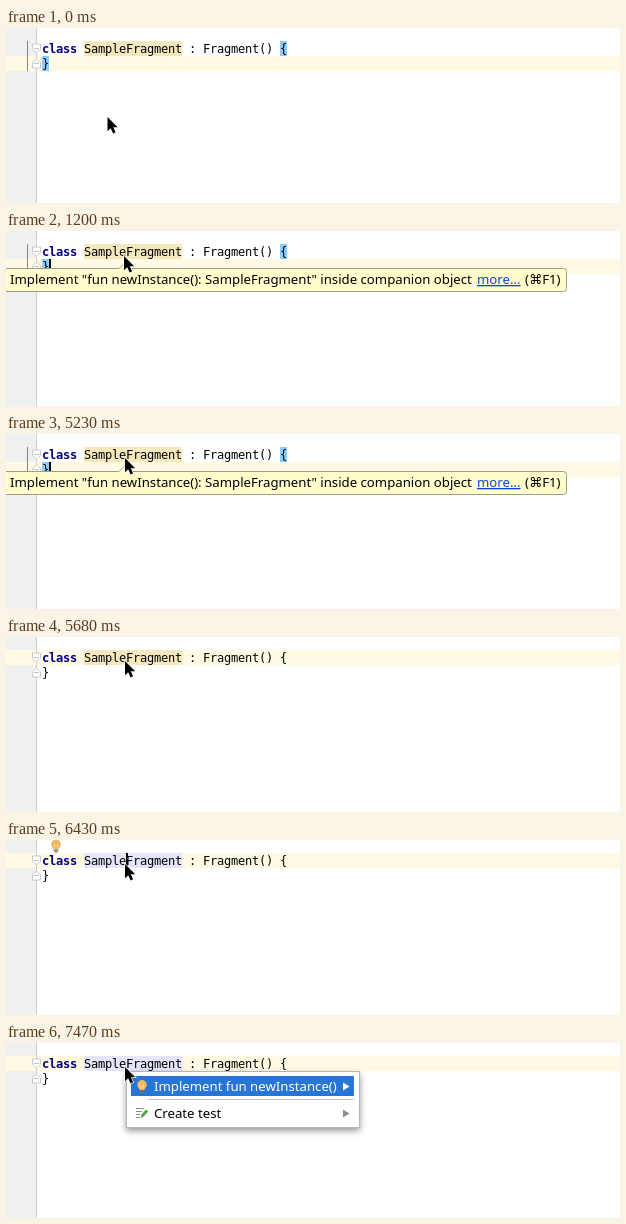
These frames come from a looping animation (614x175 px, 8000 ms). An HTML page:

```html
<!DOCTYPE html>
<html lang="en">
<head>
<meta charset="utf-8">
<title>Editor intention demo</title>
<style>
  html, body { margin: 0; width: 100%; height: 100%; overflow: hidden; background: #fff; }
  svg { display: block; width: 100%; height: 100%; }
  text { white-space: pre; }
  .code { font: 12px "DejaVu Sans Mono", monospace; letter-spacing: -.224px; }
  .key { font-weight: bold; fill: #000080; }
  .ui { font: 13.2px "Noto Sans", "DejaVu Sans", sans-serif; }
</style>
</head>
<body>
<svg viewBox="0 0 614 175">
  <defs>
    <filter id="shadow" x="-10%" y="-20%" width="120%" height="150%">
      <feDropShadow dx="0" dy="3" stdDeviation="3" flood-color="#000" flood-opacity=".4"/>
    </filter>
    <g id="bulb">
      <circle cy="-1.2" r="4.8" fill="#f3b75c"/>
      <path d="M-2.5 2h5v2h-5z" fill="#e9a94c"/>
      <path d="M-1.2 3.5V0l-1.3-1.8M1.2 3.5V0l1.3-1.8" fill="none" stroke="#fbe3b4" stroke-width=".9"/>
      <path d="M-2.4 4.6h4.8M-1.8 6.3h3.6" stroke="#777" stroke-width="1.2"/>
    </g>
    <path id="fold" d="M-3.5-4.5h8v5.5l-4 3.5-4-3.5z" fill="#fff" stroke="#c9c9c9"/>
  </defs>

  <rect width="614" height="175" fill="#fff"/>
  <rect width="30" height="175" fill="#f0f0f0"/>
  <rect id="row" width="614" height="15" fill="#fffae3"/>
  <path d="M30.5 0V175" stroke="#cfcfcf"/>
  <path id="scope" d="M21.5 13V43" stroke="#858585"/>
  <use href="#fold" x="30" y="20.5"/>
  <use href="#fold" transform="translate(30 35.5) scale(1 -1)"/>
  <path d="M28 20.5h5M28 35.5h5" stroke="#c0c0c0"/>

  <rect id="mark" x="78" y="13" width="98" height="15"/>
  <path id="braces" d="M274 13h7v15h-7zM36 28h7v15h-7z" fill="#89cdff"/>
  <text class="code" x="36" y="25"><tspan class="key">class</tspan> SampleFragment : Fragment() {</text>
  <text class="code" x="36" y="40">}</text>
  <rect id="caret" width="2" height="15"/>
  <use id="hint" href="#bulb" x="50" y="5.5"/>

  <g id="tip">
    <path d="M-5 37.5H113l6-6 6 6H557.5q3 0 3 3V57.5q0 3-3 3H-5z" fill="#fefdcb" stroke="#9c9c8c"/>
    <text class="ui" x="4" y="53">Implement "fun newInstance(): SampleFragment" inside companion object</text>
    <text class="ui" x="471" y="53" fill="#0a46e0" text-decoration="underline">more...</text>
    <text class="ui" x="519" y="53">(⌘F1)</text>
  </g>

  <g id="menu">
    <rect x="120" y="28" width="234" height="57" fill="#fff" filter="url(#shadow)"/>
    <rect x="120.5" y="28.5" width="233" height="56" fill="#fff" stroke="#b5b5b5"/>
    <rect x="125" y="33" width="223" height="20" fill="#2675d7"/>
    <use href="#bulb" x="136" y="43"/>
    <text class="ui" x="148" y="48" fill="#fff">Implement fun newInstance()</text>
    <path d="M337 39.5l6.5 4-6.5 4z" fill="#fff"/>
    <path d="M142 56.5H348" stroke="#c4c4c4"/>
    <path d="M130 65.5h8M130 68.5h6M130 71.5h4M130 74.5h4" stroke="#8a8a8a"/>
    <path d="M134.5 75l1-3.5 4.5-5 2.2 2-4.5 5z" fill="#4fa83d"/>
    <text class="ui" x="148" y="75">Create test</text>
    <path d="M337 66.5l6.5 4-6.5 4z" fill="#8c8c8c"/>
  </g>

  <path id="mouse" d="M0 0V14.2l3.2-3 2.4 5.2 2.5-1.1-2.3-5h4.4z" stroke="#fff" stroke-width="1.4" paint-order="stroke"/>
</svg>
<script>
  const LOOP = 8000, TICK = 150;
  const CLICK = 5680, MARK = 5980, MENU = 7470;
  const BLINKS = [150, 750, 1200, 1650, 2250, 2700, 3150, 3740, 4190, 4630,
                  5230, CLICK, 6280, 6720, 7170, MENU];

  const $ = id => document.getElementById(id);
  const show = (id, on) => $(id).setAttribute('visibility', on ? 'visible' : 'hidden');
  const place = (id, x, y) => $(id).setAttribute('transform', `translate(${x} ${y})`);
  const between = (t, a, b) => t >= a && t < b;

  function mousePos(t) {
    const p = Math.min(Math.floor(t / TICK) / 7, 1);
    const e = p * p * (3 - 2 * p);
    const nudge = t < 1500 ? 0 : t < 1650 ? .5 : 1;
    return [101.5 + 16.5 * e + nudge, 89 - 64 * e - nudge];
  }

  function draw(t) {
    const clicked = t >= CLICK;
    place('row', 0, clicked ? 13 : 28);
    place('caret', clicked ? 120 : 43, clicked ? 13 : 28);
    place('mouse', ...mousePos(t));
    $('mark').setAttribute('fill', t < MARK ? '#f5e8bd' : '#e4e4fb');
    show('caret', BLINKS.filter(b => b <= t).length % 2);
    show('scope', !clicked);
    show('braces', !clicked);
    show('hint', between(t, 6430, MENU));
    show('tip', between(t, 1200, CLICK) || between(t, 6580, MENU));
    show('menu', t >= MENU);
  }

  const start = performance.now();
  function tick() {
    draw((performance.now() - start) % LOOP);
    requestAnimationFrame(tick);
  }
  tick();
</script>
</body>
</html>
```
